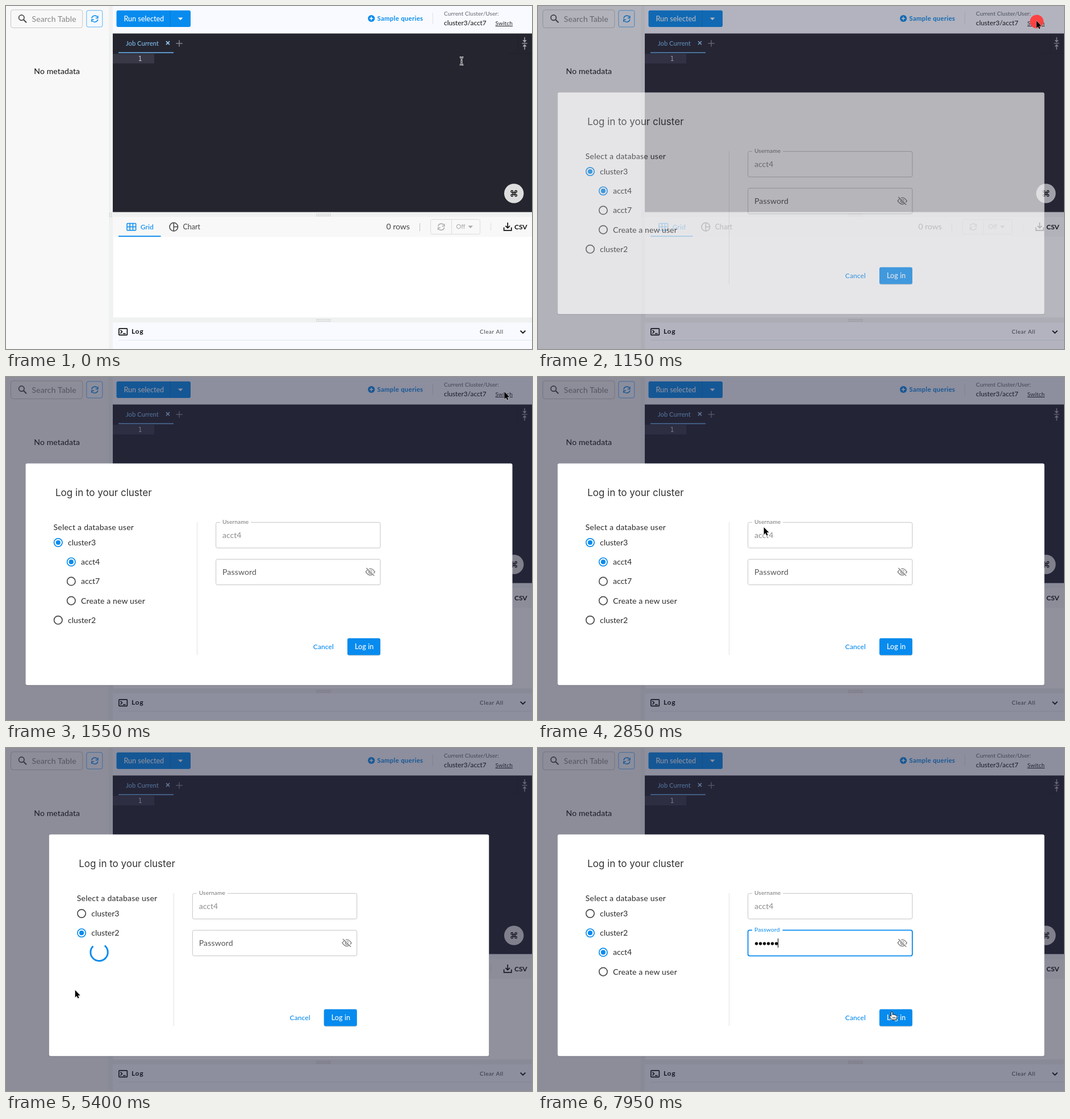
These frames come from a looping animation (926x605 px, 8000 ms). An HTML page:

```html
<!DOCTYPE html>
<html lang="en">
<head>
<meta charset="utf-8">
<title>Cluster login</title>
<style>
html, body { margin: 0; width: 100%; height: 100%; overflow: hidden; background: #f8f8f8; }
svg { display: block; width: 926px; height: 605px; }
text { font-family: Lato, "Open Sans", sans-serif; white-space: pre; }
.mono { font-family: "DejaVu Sans Mono", monospace; }
.title { font-family: Inter, "Open Sans", sans-serif; }
</style>
</head>
<body>
<svg id="stage" viewBox="0 0 926 605" xmlns="http://www.w3.org/2000/svg"></svg>
<script>
const LOOP = 8000, BLUE = '#078bee', SHIFT = 41.25;
const OPEN = 1055, PICK = 4525, LOADED = 5700, FOCUS = 7360;
const USER_A = 'acct4', USER_B = 'acct7';

// ---- drawing helpers ----
const text = (x, y, str, size, fill, ls = 0, weight = 400, extra = '') =>
  `<text x="${x}" y="${y}" font-size="${size}" fill="${fill}" letter-spacing="${ls}" font-weight="${weight}" ${extra}>${str}</text>`;
const rect = (x, y, w, h, fill, extra = '') =>
  `<rect x="${x}" y="${y}" width="${w}" height="${h}" fill="${fill}" ${extra}/>`;
const line = (d, stroke, width = 1, extra = '') =>
  `<path d="${d}" fill="none" stroke="${stroke}" stroke-width="${width}" ${extra}/>`;
const shape = (d, fill) => `<path d="${d}" fill="${fill}"/>`;
const disc = (x, y, r, fill, extra = '') => `<circle cx="${x}" cy="${y}" r="${r}" fill="${fill}" ${extra}/>`;
const at = (x, y, body, id = '') => `<g ${id && `id="${id}"`} transform="translate(${x} ${y})">${body}</g>`;

const sync = (x, y, color) => at(x, y,
  line('M-5.5-1A5.6 5.6 0 0 1 4.4-3.5M5.5-5.4V-1.3H1.5M5.5 1A5.6 5.6 0 0 1-4.4 3.5M-5.5 5.4V1.3H-1.5', color, 1.5));

function dots(x, y, cols, rows, step) {
  let s = '';
  for (let i = 0; i < cols; i++)
    for (let j = 0; j < rows; j++) s += rect(x + i * step, y + j * step, 1.4, 1.4, '#bdbdbd');
  return s;
}

// Outlined input; the gap in the top edge leaves room for its label
function outline(y, gap, color, width, id = '') {
  const l = 369.6, r = 659, b = y + 45.2, from = gap ? 377 : 400, to = gap || 400;
  return line(`M${to} ${y}H${r - 3}Q${r} ${y} ${r} ${y + 3}V${b - 3}Q${r} ${b} ${r - 3} ${b}H${l + 3}Q${l} ${b} ${l} ${b - 3}V${y + 3}Q${l} ${y} ${l + 3} ${y}H${from}`,
    color, width, id && `id="${id}"`);
}

// ---- page behind the dialog ----
const sidebar = () =>
  rect(0, 0, 181, 605, '#f8f8f8') + rect(181, 0, 7.5, 605, '#f0f1f1') + dots(181.8, 364.8, 2, 3, 3) +
  rect(8.5, 6.8, 126.3, 31.6, '#f8f8f8', 'rx="4" stroke="#c6c6c6"') +
  disc(27.3, 20.6, 4.7, 'none', 'stroke="#4a4a4a" stroke-width="1.7"') + line('M30.7 24L36 29.2', '#4a4a4a', 2.1) +
  text(45.5, 28, 'Search Table', 14, '#858585', .15) +
  rect(141.8, 7.8, 28, 29.2, '#f4f9fe', 'rx="3" stroke="#5db3f5"') + sync(156.3, 22.6, BLUE) +
  text(49.3, 120.3, 'No metadata', 14, '#111', .12);

const header = () =>
  rect(188, 0, 738, 48.5, '#f8faff') +
  rect(194.5, 7.7, 130.5, 29.4, BLUE, 'rx="3"') + line('M289 7.7V37', '#0679d1') +
  text(207.5, 27.3, 'Run selected', 12.5, '#fff', 0, 500) + shape('M302.8 20.6h8.6l-4.3 4.4z', '#fff') +
  disc(643.2, 22, 6.1, BLUE) + line('M643.2 18.8v6.4M640 22h6.4', '#fff', 1.5) +
  text(653.5, 26.3, 'Sample queries', 11.3, BLUE, .33, 700) + line('M751.5 12V32', '#dfe1e6') +
  text(771, 16.6, 'Current Cluster/User:', 10, '#60636b', .1) +
  text(771, 34, 'cluster3/' + USER_B, 11.8, '#111', 0) +
  text(861.5, 33.6, 'Switch', 10, '#222', .2) + line('M861.5 35.5H892', '#222');

const editor = () =>
  rect(188, 48.5, 738, 315.2, '#252530') + line('M901.5 49V83.5M885 83.5H926', '#20202a') +
  text(211, 70, 'Job Current', 11.2, '#7fbdee', 0, 500) + rect(198, 81.5, 97, 1.6, '#6db5ee') +
  line('M281.9 62.1l6 6m0-6l-6 6', '#9bcdf4', 1.5) + line('M299.3 66h11.4M305 60.3v11.4', '#83838c', 1.5) +
  line('M913 55v8M913 77v-8M908.5 65.9h9', '#a9a9b0', 1.4) +
  shape('M909.3 60.2h7.4l-3.7 4.4zM909.3 71.6h7.4l-3.7-4.4z', '#a9a9b0') +
  rect(188, 84.3, 73, 17, '#383846') + text(232.6, 97, '1', 11.5, '#c8c8cf', 0, 400, 'class="mono"') +
  disc(894.2, 331.4, 17.4, '#000', 'opacity=".25"') + disc(894.2, 330.6, 17.2, '#dedede') +
  at(894.2, 330.6, line('M-1.7-3.4a1.75 1.75 0 1 0-1.75 1.75h6.9A1.75 1.75 0 1 0 1.7-3.4v6.8A1.75 1.75 0 1 0 3.45 1.65h-6.9A1.75 1.75 0 1 0-1.7 3.4z', '#111', 1.4));

const results = () =>
  rect(188, 363.7, 738, 8.5, '#f0f1f1') + dots(546, 366.4, 9, 2, 3) +
  rect(188, 372.2, 738, 35, '#f8f8f8') + rect(189, 407.2, 737, 142.3, '#fff') +
  rect(213, 383.4, 15.6, 12.4, 'none', `rx="1" stroke="${BLUE}" stroke-width="1.5"`) +
  line('M218.2 383.4v12.4M223.4 383.4v12.4M213 389.6h15.6', BLUE, 1.5) +
  text(236.8, 394, 'Grid', 12.2, BLUE, 0, 500) + rect(198, 405.2, 74.5, 1.9, BLUE) +
  disc(295.3, 389.6, 7.3, 'none', 'stroke="#444" stroke-width="1.5"') + line('M295.3 382.3v14.6M295.3 389.6h7.3', '#444', 1.5) +
  text(311.4, 394, 'Chart', 12.5, '#444') + text(669.5, 394.4, '0 rows', 14, '#444') +
  line('M728.5 383V397', '#c2c2c2') +
  rect(747.5, 376.5, 87, 26, '#f8f8f8', 'rx="3" stroke="#dcdcdc"') + line('M784.5 376.5v26', '#dcdcdc') +
  sync(766.2, 389.6, '#a9a9a9') + text(792.4, 393.4, 'Off', 11, '#a6a6a6') + shape('M813.4 387.4h8.6l-4.3 4.5z', '#a9a9a9') +
  line('M853.5 383V396', '#dcdcdc') +
  line('M883.2 382v9M879.4 387.8l3.8 3.8 3.8-3.8M876.6 390.5v5.4h13.2v-5.4', '#111', 1.7) +
  text(895, 394, 'CSV', 12, '#111', 0, 700);

const log = () =>
  rect(188, 549.5, 738, 8.8, '#f0f1f1') + dots(546, 552.2, 9, 2, 3) +
  rect(188, 558.3, 738, 47, '#f8faff') + line('M198 589.5H926', '#e4e7ef') +
  rect(198.8, 568.8, 14.6, 11.6, 'none', 'rx="1.2" stroke="#111" stroke-width="1.7"') +
  line('M201.5 571.6l3 3-3 3M206 577.8h4.6', '#111', 1.5) +
  text(221, 578.2, 'Log', 12, '#111', .7, 700) + text(834, 578, 'Clear All', 10, '#444', .58) +
  line('M905.6 572.6l4.4 4.3 4.4-4.3', '#111', 1.9);

// ---- dialog ----
// Each row: left edge of the radio, label, right edge, checked
const TOP = 91.8, SUB = 114.8, LABEL_END = { cluster: 157, user: 166, create: 242 };
const LISTS = {
  before: [[TOP, 'cluster3', LABEL_END.cluster, 1], [SUB, USER_A, LABEL_END.user, 1], [SUB, USER_B, LABEL_END.user, 0],
           [SUB, 'Create a new user', LABEL_END.create, 0], [TOP, 'cluster2', LABEL_END.cluster, 0]],
  loading: [[TOP, 'cluster3', LABEL_END.cluster, 0], [TOP, 'cluster2', LABEL_END.cluster, 1]],
  after: [[TOP, 'cluster3', LABEL_END.cluster, 0], [TOP, 'cluster2', LABEL_END.cluster, 1],
          [SUB, USER_A, LABEL_END.user, 1], [SUB, 'Create a new user', LABEL_END.create, 0]]
};
const rowY = i => 292 + i * 34.2;

const radio = ([x, label, , on], i) =>
  disc(x, rowY(i), 7.2, 'none', `stroke="${on ? BLUE : '#4a4a4a'}" stroke-width="1.7"`) +
  (on ? disc(x, rowY(i), 4.1, BLUE) : '') + text(x + 17.2, rowY(i) + 4.9, label, 14, '#2b2b2b', label.length > 9 ? .13 : -.05);

const leftPane = () =>
  text(87, 209.7, 'Log in to your cluster', 17, '#333', 0, 400, 'class="title"') +
  text(83.5, 270, 'Select a database user', 14, '#2b2b2b', .24) +
  Object.entries(LISTS).map(([name, rows]) => `<g id="${name}">${rows.map(radio).join('')}</g>`).join('') +
  at(122.8, 360.3, `<circle id="spinner" r="15.2" fill="none" stroke="${BLUE}" stroke-width="2.9" pathLength="126"/>`);

const rightPane = () =>
  line('M336.5 256V490.5', '#e2e2e2') +
  outline(256.4, 431, '#c4c4c4', 1) + text(381, 259.2, 'Username', 10.2, '#777', .12) +
  text(381, 284.4, USER_A, 14, '#8c8c8c') +
  outline(321.4, 0, '#c4c4c4', 1, 'idle') + outline(321.4, 430.5, BLUE, 1.8, 'focus') +
  `<g id="label">${text(0, 0, 'Password', 14, 'inherit', .16).replace('fill="inherit"', '')}</g>` +
  [...Array(6)].map((_, i) => disc(384.6 + 7 * i, 345, 2.7, '#111', 'class="bullet"')).join('') +
  line('M0 336V352', '#111', 1.1, 'id="caret"') +
  at(641.3, 343.8,
    line('M-8 0Q0-11.5 8 0Q0 11.5-8 0Z', '#8a8a8a', 1.5) + disc(0, 0, 2.7, 'none', 'stroke="#8a8a8a" stroke-width="1.5"') +
    line('M-5.9-8L7.9 5.8', '#fff', 1.6) + line('M-7-7L7 7', '#8a8a8a', 1.5)) +
  text(540.8, 480.2, 'Cancel', 12, BLUE, .1, 500) +
  rect(601, 461.8, 58.2, 29.8, '#000', 'rx="3.5" opacity=".22"') + rect(601, 460.8, 58, 29.6, BLUE, 'rx="3"') +
  text(614, 480.2, 'Log in', 12.5, '#fff', .1, 500);

// ---- pointers, hot spot at 0,0 ----
const arrow = shape('M0 0V12.9L2.9 10.2 4.8 14.6 6.9 13.7 5 9.4H9z', '#000')
  .replace('/>', ' stroke="#fff" stroke-width=".9" paint-order="stroke"/>');
const hand = '<path fill="#fff" stroke="#111" stroke-width="1" stroke-linejoin="round" d="M-1.7 8.6V1.7C-1.7.2 1 .2 1 1.7V6C1.2 4.9 3.5 5 3.6 6.3 4 5.4 6 5.6 6.1 6.9 6.6 6.2 8.6 6.5 8.6 8.2 8.6 11.2 7.6 12 7.1 14.8H.2C-.5 13-2.7 11.2-4.5 8.9-5.2 7.6-3.3 6.8-2.3 8z"/>' +
  line('M1.5 9.4v3.2M3.5 9.4v3.2M5.5 9.4v3.2', '#111', .8);
const beamPath = 'M-3.2-6.6Q0-6.6 0-4.4Q0-6.6 3.2-6.6M0-4.4V4.4M-3.2 6.6Q0 6.6 0 4.4Q0 6.6 3.2 6.6M-1.8 1.6H1.8';
const beam = line(beamPath, '#fff', 2.6) + line(beamPath, '#222', .9);

const stage = document.getElementById('stage');
stage.innerHTML =
  sidebar() + header() + editor() + results() + log() +
  rect(0, 0, 926, 605, '#25253e', 'id="backdrop"') +
  '<g id="dialog">' +
    '<rect id="shade" y="153.5" height="391" rx="4" opacity=".22"/>' +
    '<rect id="paper" y="152.4" height="391" rx="3" fill="#fff"/>' +
    at(0, 0, leftPane(), 'left') + at(0, 0, rightPane(), 'right') +
  '</g>' +
  disc(0, 0, 0, '#ff3d3d', 'id="pulse" opacity=".96"') +
  `<g id="cursor"><g id="arrow">${arrow}</g><g id="hand">${hand}</g><g id="beam">${beam}</g></g>`;

const $ = id => document.getElementById(id);
const bullets = [...document.querySelectorAll('.bullet')];
const set = (id, attrs) => { for (const k in attrs) $(id).setAttribute(k, attrs[k]); };
const show = (el, on) => el.setAttribute('visibility', on ? 'visible' : 'hidden');

// ---- motion ----
const clamp = v => Math.min(1, Math.max(0, v));
const span = (t, from, to) => clamp((t - from) / (to - from));
const mix = (a, b, p) => a + (b - a) * p;
const inOut = p => p < .5 ? 4 * p ** 3 : 1 - 4 * (1 - p) ** 3;

// cubic-bezier(x1, 0, x2, 1)
function bezier(x1, x2, x) {
  let lo = 0, hi = 1, s = x;
  for (let i = 0; i < 24; i++) {
    s = (lo + hi) / 2;
    if (3 * (1 - s) ** 2 * s * x1 + 3 * (1 - s) * s * s * x2 + s ** 3 < x) lo = s; else hi = s;
  }
  return 3 * (1 - s) * s * s + s ** 3;
}
const standard = x => bezier(.4, .2, x);
const easeInOut = x => bezier(.42, .58, x);

// Pointer moves: start, end, x, y
const START = [802, 97];
const MOVES = [
  [0, 690, 877.4, 26], [2060, 2880, 397.5, 265], [3150, 4220, 121.7, 427],
  [6310, 7040, 440, 345], [7450, 7960, 623.3, 464.8]
];
const CLICKS = [[900, 878, 27.5], [4400, 122, 428], [7300, 440, 345]];
const CLICK_MS = 650;

function pointer(t) {
  let [x, y] = START;
  for (const [from, to, nx, ny] of MOVES) {
    const p = inOut(span(t, from, to));
    x = mix(x, nx, p);
    y = mix(y, ny, p);
  }
  return [x, y];
}

const inside = (x, y, l, t, r, b) => x >= l && x <= r && y >= t && y <= b;

function pointerKind(t, x, y, state) {
  if (t < OPEN) return inside(x, y, 188, 84, 926, 363) ? 'beam' : inside(x, y, 861, 0, 892, 38) ? 'hand' : 'arrow';
  if (inside(x, y, 369, 321, 660, 367)) return 'beam';
  if (inside(x, y, 601, 461, 659, 491)) return 'hand';
  const dx = state === 'loading' ? SHIFT : 0;
  const hit = LISTS[state].some(([l, , r], i) => inside(x, y, l - 8 + dx, rowY(i) - 11, r + dx, rowY(i) + 11));
  return hit ? 'hand' : 'arrow';
}

function spin(t) {
  const p = ((t - PICK) / 1400) % 1;
  const a = easeInOut(clamp(p * 2)), b = easeInOut(clamp(p * 2 - 1));
  set('spinner', {
    'stroke-dasharray': `${mix(1, 100, a)} 200`,
    'stroke-dashoffset': -15 * a - 110 * b,
    transform: `rotate(${360 * p})`
  });
}

function password(t, hover) {
  const focused = t >= FOCUS, p = standard(span(t, FOCUS, FOCUS + 200));
  const typed = Math.max(0, Math.min(6, Math.floor((t - 7500) / 50) + 1));
  show($('idle'), !focused);
  show($('focus'), focused);
  set('idle', { stroke: hover ? '#333' : '#c4c4c4' });
  set('label', {
    transform: `translate(381 ${mix(348.6, 324.4, p)}) scale(${mix(1, .745, p)})`,
    fill: focused ? BLUE : '#555'
  });
  bullets.forEach((el, i) => show(el, i < typed));
  show($('caret'), focused);
  set('caret', { transform: `translate(${381.5 + typed * 6.85} 0)` });
}

function draw(t) {
  const state = t < PICK ? 'before' : t < LOADED ? 'loading' : 'after';
  const loading = state === 'loading', dx = loading ? SHIFT : 0;
  const fade = standard(span(t, OPEN, OPEN + 225));

  set('backdrop', { opacity: fade * .5 });
  set('dialog', { opacity: fade });
  set('shade', { x: 34 + dx, width: 858 - 2 * dx });
  set('paper', { x: 34.5 + dx, width: 857 - 2 * dx });
  set('left', { transform: `translate(${dx} 0)` });
  set('right', { transform: `translate(${-dx} 0)` });
  for (const name in LISTS) show($(name), name === state);
  show($('spinner'), loading);
  if (loading) spin(t);

  const [x, y] = pointer(t), kind = pointerKind(t, x, y, state);
  set('cursor', { transform: `translate(${x} ${y})` });
  for (const k of ['arrow', 'hand', 'beam']) show($(k), k === kind);
  password(t, t > OPEN && kind === 'beam');

  const click = CLICKS.find(([from]) => t >= from && t < from + CLICK_MS);
  show($('pulse'), click);
  if (click) set('pulse', { cx: click[1], cy: click[2], r: 19.5 * (1 - (t - click[0]) / CLICK_MS) });
}

const begin = performance.now();
function tick() {
  draw((performance.now() - begin) % LOOP);
  requestAnimationFrame(tick);
}
tick();
</script>
</body>
</html>
```
